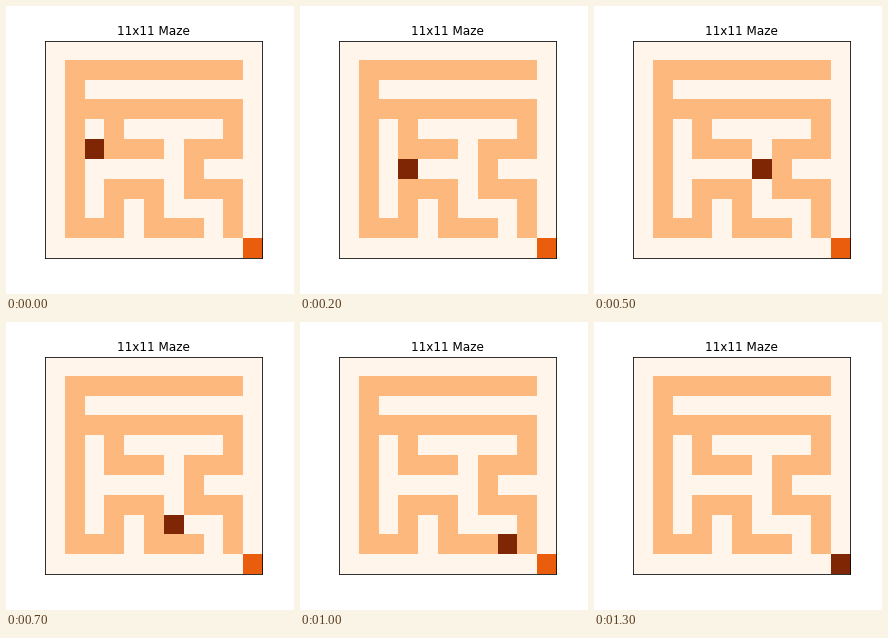
A matplotlib script that plays this animation: 288 px wide and 288 px high, repeating every 1.4 s.

```python
import numpy as np
import matplotlib.pyplot as plt
from matplotlib.animation import FuncAnimation

WALL, GOAL, PLAYER = 1, 2, 3
MAZE = """
...........
.#########.
.#.........
.#########.
.#.#.....#.
.#.###.###.
.#.....#...
.#.###.###.
.#.#.#...#.
.###.###.#.
...........
""".split()
START, MOVES = (5, 2), "DRRRRDDRRDDRR"
STEPS = {"D": (1, 0), "R": (0, 1)}

grid = np.array([[WALL if c == "#" else 0 for c in row] for row in MAZE])
grid[-1, -1] = GOAL
path = np.cumsum([START] + [STEPS[m] for m in MOVES], axis=0)

fig = plt.figure(figsize=(4, 4), dpi=72, facecolor="white")
fig.subplots_adjust(left=0.125, right=0.9, bottom=0.125, top=0.88)
ax = fig.add_subplot()
ax.set_title("11x11 Maze", fontsize=12, family="DejaVu Sans")
ax.set_xticks([])
ax.set_yticks([])
image = ax.imshow(grid, cmap="Oranges", vmin=0, vmax=PLAYER,
                  interpolation="nearest")


def draw(step):
    state = grid.copy()
    state[tuple(path[step])] = PLAYER
    image.set_data(state)
    return [image]


anim = FuncAnimation(fig, draw, frames=len(path), interval=100,
                     repeat=True, repeat_delay=0)
plt.show()
```
